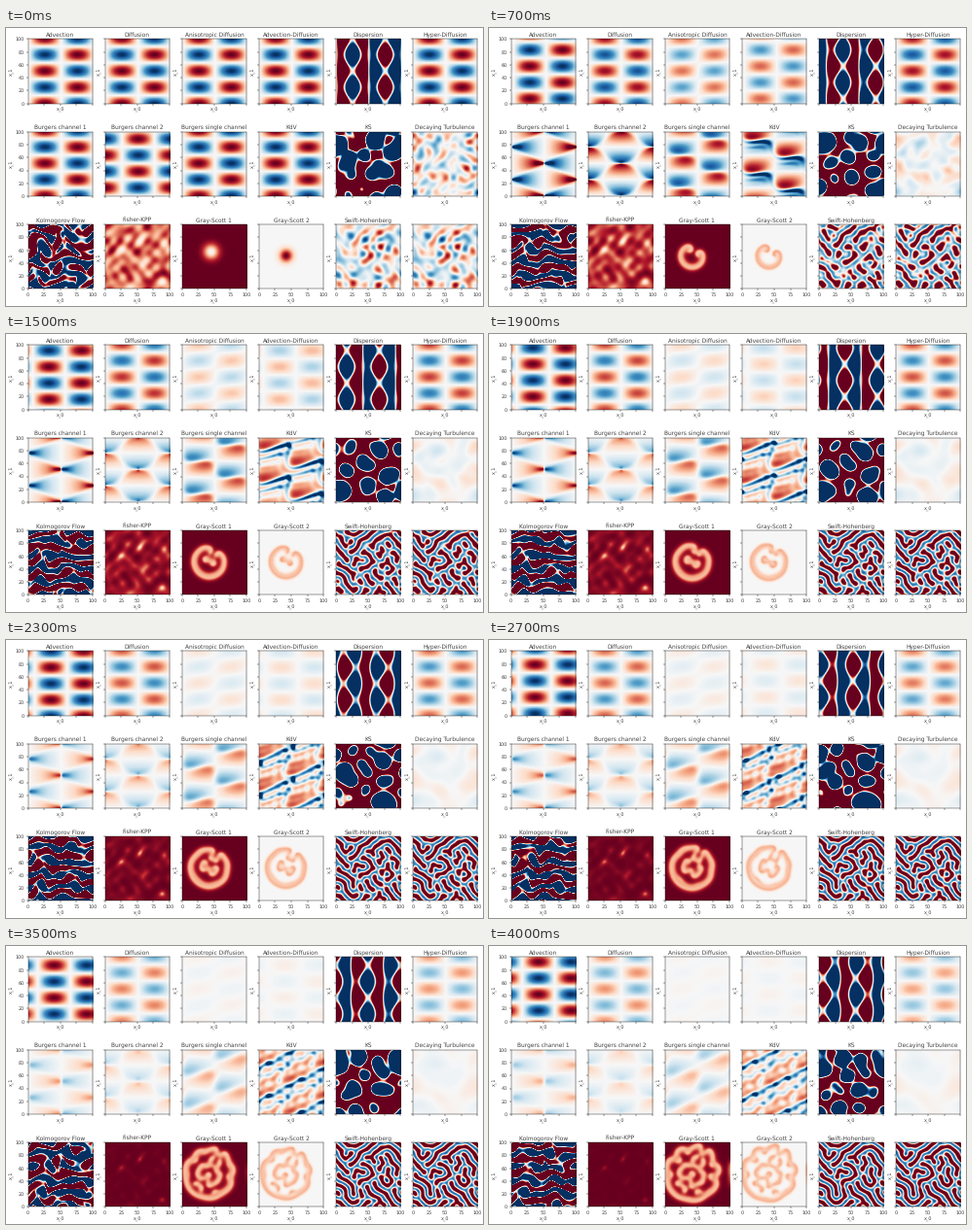
Write a matplotlib script that moves like this. It is 490 px wide and 286 px high and loops after 4.1 s.

```python
import numpy as np
import matplotlib.pyplot as plt
from matplotlib.animation import FuncAnimation

N = 100
FRAMES = 41
TAU = 2 * np.pi

# Unit-square grid and wavenumbers, arrays indexed [y, x]
X, Y = np.meshgrid(np.arange(N) / N * TAU, np.arange(N) / N * TAU)
IX = np.fft.rfftfreq(N, 1 / N)[None, :]
IY = np.fft.fftfreq(N, 1 / N)[:, None]
KX, KY = TAU * IX, TAU * IY
K2 = KX**2 + KY**2
MASK = (IX < N / 3) & (abs(IY) < N / 3)


def fwd(u):
    return np.fft.rfft2(u) * MASK


def inv(v):
    return np.fft.irfft2(v, s=(N, N))


def noise(seed, cut=5):
    """Band-limited random field with a peak of one."""
    white = np.random.default_rng(seed).normal(size=(N, N))
    u = inv(fwd(white) * ((IX <= cut) & (abs(IY) <= cut) & (K2 > 0)))
    return u / abs(u).max()


def roll_min(u, row, col):
    """Shift the field so that its minimum lies at the given cell."""
    r, c = np.unravel_index(u.argmin(), u.shape)
    return np.roll(u, (row - r, col - c), (0, 1))


def evolve(u0, lin, rhs, dt, sub, warm=0):
    """Second-order exponential time stepping, one field per frame."""
    z = lin * dt
    small = abs(z) < 1e-3
    zs = np.where(small, 1, z)
    e = np.exp(z)
    p1 = dt * np.where(small, 1 + z / 2, (e - 1) / zs)
    p2 = dt * np.where(small, 0.5 + z / 6, (e - 1 - z) / zs**2)

    def step(v):
        n = rhs(v)
        a = e * v + p1 * n
        return a + p2 * (rhs(a) - n)

    v = fwd(u0)
    for _ in range(warm):
        v = step(v)
    out = [inv(v)]
    for _ in range(FRAMES - 1):
        for _ in range(sub):
            v = step(v)
        out.append(inv(v))
    return np.array(out)


# Linear equations in closed form
def over_time(f):
    return np.array([f(t) for t in range(FRAMES)])


def wave(t, a=0.0, b=0.0):
    return np.sin(X - TAU * a * t) * np.cos(2 * (Y - TAU * b * t))


def tilted(t):
    return 0.5 * (np.exp(-0.095 * t) * np.sin(X + 2 * Y)
                  + np.exp(-0.08 * t) * np.sin(X - 2 * Y))


def dispersed(t):
    p = 3 * np.pi * t / 31
    return 2.5 * (wave(t, p / TAU / 27, 0.0104) + np.sin(3 * X - p))


VEL = (0.004, 0.0104)
advection = over_time(lambda t: wave(t, *VEL))
diffusion = over_time(lambda t: np.exp(-0.02 * t) * wave(t))
anisotropic = over_time(tilted)
adv_diff = over_time(lambda t: np.exp(-0.077 * t) * wave(t, *VEL))
dispersion = over_time(dispersed)
hyper = over_time(lambda t: np.exp(-0.024 * t) * wave(t))


# Nonlinear equations
def burgers_rhs(v):
    a, b = inv(v)
    ab = fwd(a * b)
    return -0.009j * np.stack([KX * fwd(a * a) + KY * ab,
                               KX * ab + KY * fwd(b * b)])


def convect(c):
    return lambda v: -c / 2 * 1j * (KX + KY) * fwd(inv(v)**2)


def vortex(c, force=0):
    lap = np.where(K2 > 0, K2, 1)

    def rhs(v):
        psi = v / lap
        ux, uy = inv(1j * KY * psi), inv(-1j * KX * psi)
        return force - c * fwd(ux * inv(1j * KX * v) + uy * inv(1j * KY * v))
    return rhs


FLAME_SIZE = 28


def flame_rhs(v):
    g = 1j * v / FLAME_SIZE
    n = -0.5 * fwd(inv(KX * g)**2 + inv(KY * g)**2)
    n[0, 0] = 0
    return n


def growth_rhs(v):
    u = inv(v)
    return 0.12 * fwd(u * (1 - u))


def swift_rhs(v):
    u = inv(v)
    return fwd(u**2 - u**3)


FEED, KILL = 0.04, 0.06


def gray_rhs(v):
    a, b = inv(v)
    r = fwd(a * b * b)
    n = np.stack([-r, r])
    n[0, 0, 0] += FEED * N * N
    return n


def blob(cx, cy, s):
    return np.exp(-((X / TAU - cx)**2 + (Y / TAU - cy)**2) / (2 * s * s))


start = wave(0)
burgers = evolve(np.stack([start, np.cos(X) * np.sin(2 * Y)]),
                 -1.2e-4 * K2, burgers_rhs, 0.25, 4)
single = evolve(start, -1.2e-4 * K2, convect(0.01), 0.25, 4)
kdv = evolve(start, 2.5e-6j * (KX + KY) * K2 - 2.5e-9 * K2**2,
             convect(-0.0156), 0.125, 8)

q = K2 / FLAME_SIZE**2
flame = evolve(noise(4), q - q**2, flame_rhs, 0.125, 4, warm=400)
decay = evolve(noise(8), -2e-4 * K2, vortex(0.6), 0.25, 4)
kolmogorov = evolve(-8 * np.cos(5 * Y) + 5 * noise(2, 4),
                    -3.5e-4 * K2 - 0.1,
                    vortex(1, fwd(-5 * np.cos(5 * Y))), 0.016, 12, warm=320)

seeded = noise(11)
seeded = (seeded - seeded.min()) / np.ptp(seeded)
fisher = evolve(roll_min(seeded, 73, 53), -3e-6 * K2, growth_rhs, 0.5, 2)

gray = evolve(np.stack([1 - blob(0.44, 0.56, 0.08), blob(0.41, 0.5, 0.07)]),
              np.stack([-2e-5 * K2 - FEED, -1e-5 * K2 - FEED - KILL]),
              gray_rhs, 1.6, 25)

swift = evolve(roll_min(noise(21), 75, 45),
               0.7 - (1 - K2 / (8.5 * TAU)**2)**2, swift_rhs, 0.14, 5)

panels = [
    ("Advection", advection), ("Diffusion", diffusion),
    ("Anisotropic Diffusion", anisotropic),
    ("Advection-Diffusion", adv_diff),
    ("Dispersion", dispersion), ("Hyper-Diffusion", hyper),
    ("Burgers channel 1", burgers[:, 0]),
    ("Burgers channel 2", burgers[:, 1]),
    ("Burgers single channel", single), ("KdV", kdv),
    ("KS", flame), ("Decaying Turbulence", decay),
    ("Kolmogorov Flow", kolmogorov), ("Fisher-KPP", fisher),
    ("Gray-Scott 1", gray[:, 0]), ("Gray-Scott 2", gray[:, 1]),
    ("Swift-Hohenberg", swift), ("", swift),
]

# Stage of 490 x 286 pixels
W, H = 490, 286
SIDE = 66.2
INK = "0.25"
plt.rcParams.update({
    "font.family": "DejaVu Sans", "text.hinting": "none",
    "text.color": INK, "axes.labelcolor": INK,
    "xtick.labelcolor": INK, "ytick.labelcolor": INK,
})
fig = plt.figure(figsize=(14, 8.1714285714286), dpi=35, facecolor="white")

images = []
for i, (title, data) in enumerate(panels):
    row, col = divmod(i, 6)
    left, bottom = 22.6 + 79.1 * col, H - 77.6 - 95.4 * row
    ax = fig.add_axes([left / W, bottom / H, SIDE / W, SIDE / H])
    images.append(ax.imshow(data[0], cmap="RdBu_r", vmin=-1, vmax=1,
                            origin="lower", extent=(0, 100, 0, 100),
                            aspect="auto"))
    ax.set_xticks(range(0, 101, 25))
    ax.set_yticks(range(0, 101, 20))
    ax.tick_params(labelbottom=row == 2, labelleft=col == 0)
    ax.set_xlabel("x_0")
    ax.set_ylabel("x_1")
    ax.set_title(title)


def update(n):
    for im, (_, data) in zip(images, panels):
        im.set_data(data[n])
    return images


anim = FuncAnimation(fig, update, frames=FRAMES, interval=100,
                     repeat=True, blit=False)
plt.show()
```
